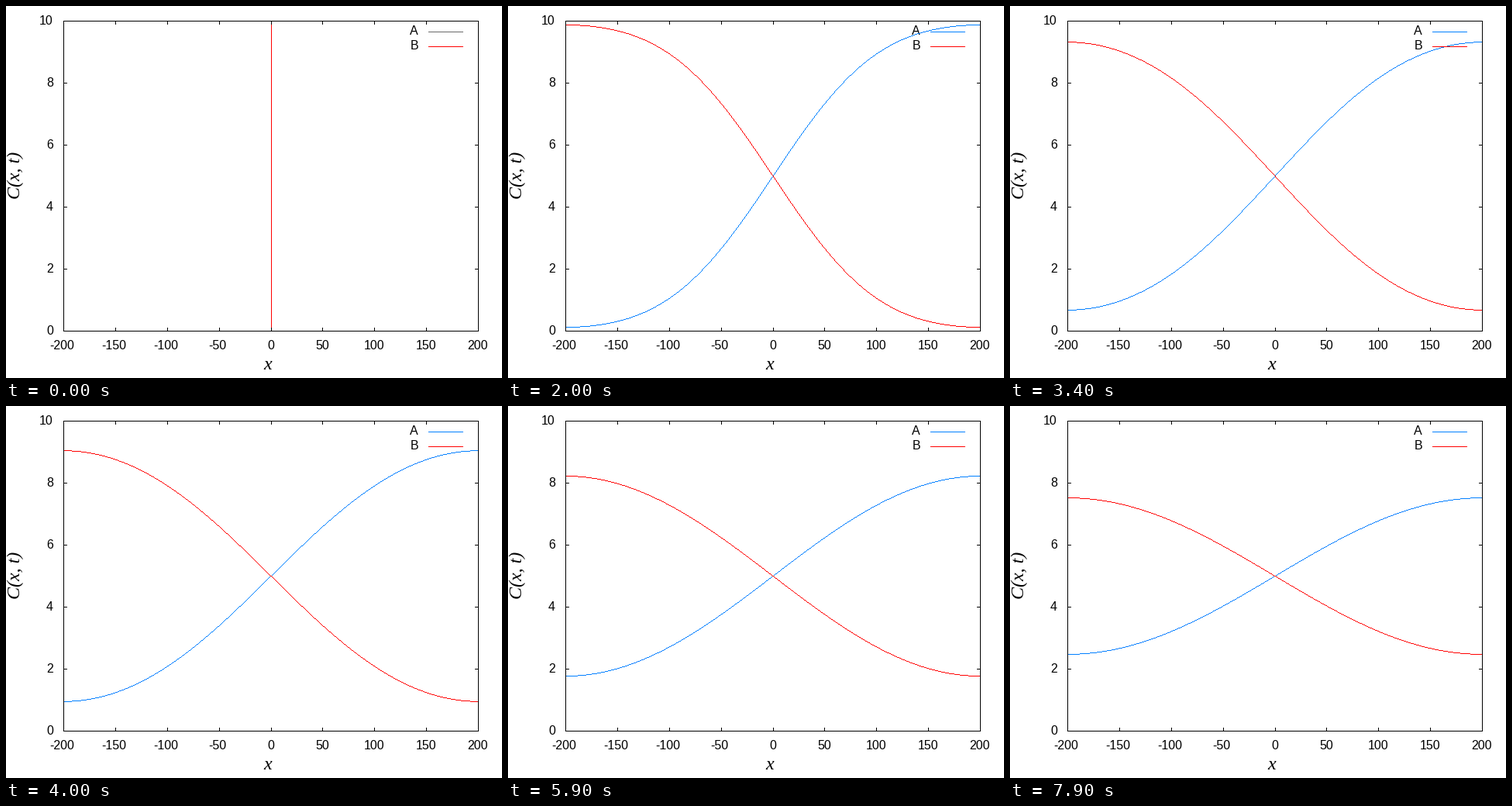
Recreate the animation shown at these times as a matplotlib script. Size 640 px wide and 480 px high, loop 8000 ms.

```python
import numpy as np
import matplotlib
import matplotlib.pyplot as plt
from matplotlib.animation import FuncAnimation

matplotlib.rcParams["path.simplify"] = False

W, H, DPI = 640, 480, 100
PX = 72 / DPI                                # one pixel in points
LEFT, RIGHT, TOP, BOTTOM = 74, 609, 19, 419
MID = 342
BLUE, RED, GRAY = "#0080ff", "#ff0000", "#696969"
HOLD = 4                                     # extra frames on the first state
SPREAD = 200                                 # diffusivity times time per step
KEY_X0, KEY_X1, KEY_A, KEY_B = 545, 589, 33, 52

fig = plt.figure(figsize=(W / DPI, H / DPI), dpi=DPI, facecolor="white")
ax = fig.add_axes([0, 0, 1, 1])
ax.set_xlim(0, W)
ax.set_ylim(H, 0)
ax.axis("off")


def px(x):
    return LEFT + (x + 200) * (RIGHT - LEFT) / 400


def py(c):
    return BOTTOM - c * (BOTTOM - TOP) / 10


def nearest(v):
    return np.floor(v + 0.5)


def line(xs, ys, color, z):
    """Straight line through whole pixels, both ends included."""
    return ax.plot(xs, ys, color=color, lw=PX, antialiased=False, zorder=z,
                   solid_capstyle="butt", solid_joinstyle="miter",
                   snap=True)[0]


def trace(color, z):
    """Empty curve, later filled with separate pixel dots."""
    return ax.plot([], [], color=color, lw=PX / 2, antialiased=False,
                   zorder=z, solid_capstyle="butt", snap=False)[0]


def label(x, y, s, ha="center", size=16, family="Liberation Sans", **kw):
    ax.text(x, y, s, ha=ha, va="baseline", fontsize=size * PX,
            family=family, color="black", zorder=1, **kw)


def draw_frame():
    line([LEFT, RIGHT, RIGHT, LEFT, LEFT], [TOP, TOP, BOTTOM, BOTTOM, TOP],
         "black", 6)
    for v in range(-200, 201, 50):
        x = nearest(px(v))
        line([x, x], [TOP, TOP + 4], "black", 6)
        line([x, x], [BOTTOM - 4, BOTTOM], "black", 6)
        label(x - 2 if v < 0 else x, 443, str(v))
    for v in range(0, 11, 2):
        y = py(v)
        line([LEFT, LEFT + 4], [y, y], "black", 6)
        line([RIGHT - 4, RIGHT], [y, y], "black", 6)
        label(61, y + 5.3, str(v), ha="right")
    serif = dict(size=24, family="Liberation Serif", style="italic")
    label(338, 469, "x", **serif)
    label(18, 218, "C(x, t)", rotation=90, rotation_mode="anchor", **serif)


def profile(x, n):
    """Smoothed unit step between two closed walls at x = -200 and 200."""
    m = np.arange(1, 100, 2)[:, None]
    k = m * np.pi / 400
    return (4 / np.pi * np.sin(k * x) / m * np.exp(-k * k * SPREAD * n)).sum(0)


def fill(curve, x, y):
    """One pixel per column, plus one per row where the curve is steep."""
    order = slice(None) if y[0] < y[-1] else slice(None, None, -1)
    rows = np.arange(np.ceil(y.min()), np.floor(y.max()) + 1)
    cx = np.r_[cols, nearest(np.interp(rows, y[order], x[order]))]
    cy = np.r_[nearest(np.interp(cols, x, y)), rows] + 0.5
    gap = np.full(len(cx), np.nan)
    curve.set_data(np.c_[cx + 0.3, cx + 0.7, gap].ravel(),
                   np.c_[cy, cy, gap].ravel())


draw_frame()
label(532, 37, "A", ha="right")
label(532, 56, "B", ha="right")
line([KEY_X0, KEY_X1], [KEY_A, KEY_A], GRAY, 2)
key_a = line([], [], BLUE, 2.5)
line([KEY_X0, KEY_X1], [KEY_B, KEY_B], RED, 4)
curve_a = trace(BLUE, 3)
curve_b = trace(RED, 5)

cols = np.arange(LEFT, RIGHT + 1)
xs = (cols - LEFT) * 400 / (RIGHT - LEFT) - 200


def update(i):
    n = max(0, i - HOLD)
    if n == 0:
        x = np.array([LEFT, MID, MID, RIGHT])
        s = np.array([-1, -1, 1, 1])
    else:
        x, s = cols, profile(xs, n)
    up, down = py(5 + 5 * s), py(5 - 5 * s)
    fill(curve_a, x, up)
    fill(curve_b, x, down)

    # the key turns blue as far as the curves have spread
    reach = min(KEY_X1, x[nearest(up) > TOP].max())
    if reach > KEY_X0:
        key_a.set_data([KEY_X0, reach], [KEY_A, KEY_A])
    else:
        key_a.set_data([], [])
    return curve_a, curve_b, key_a


anim = FuncAnimation(fig, update, frames=80, interval=100, repeat=True,
                     repeat_delay=0, blit=False)
plt.show()
```
